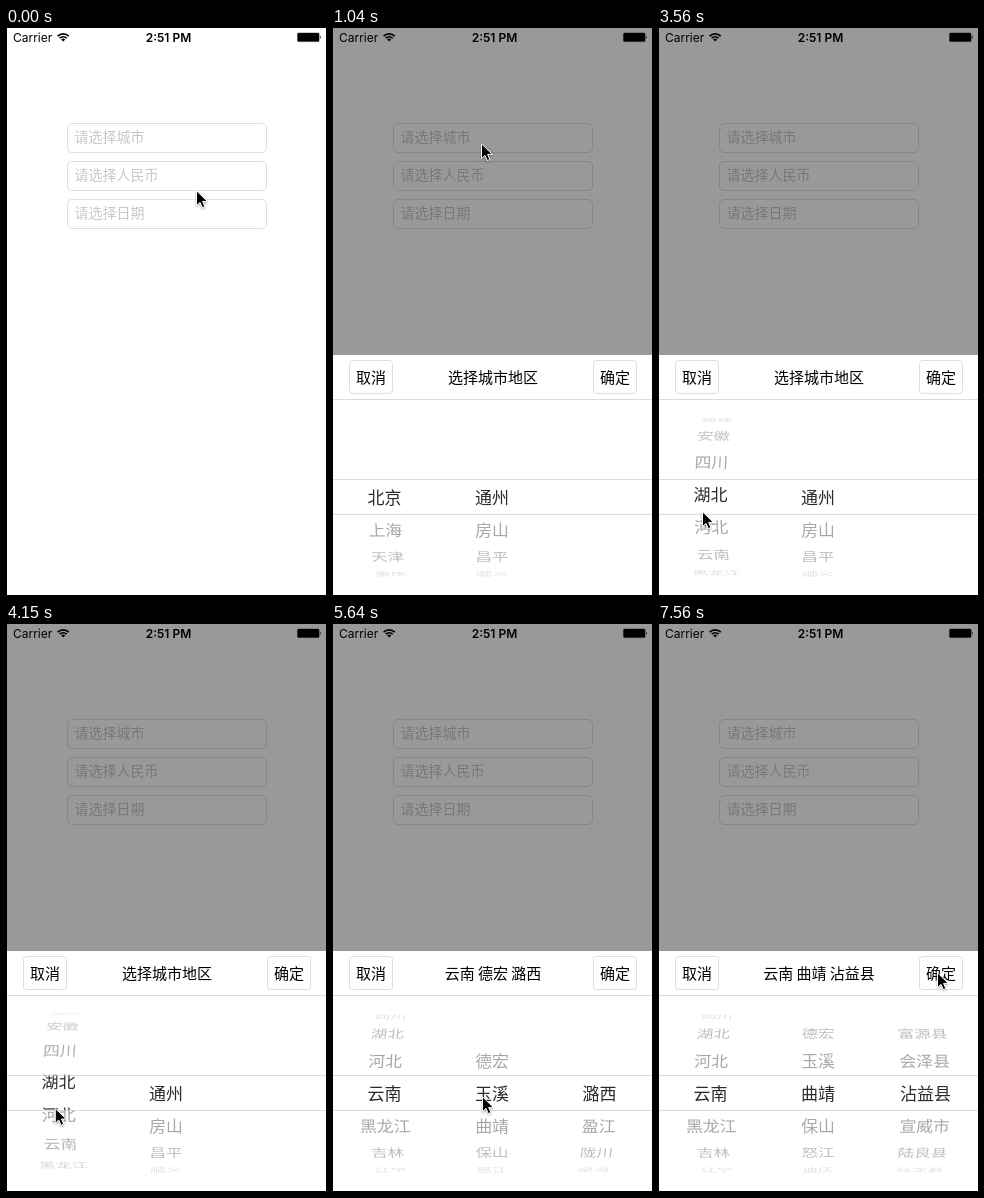
Recreate the animation shown at these times as an HTML page. Size 320 by 568 pixels, loop 8000 ms.

```html
<!DOCTYPE html>
<html lang="zh-CN">
<head>
<meta charset="utf-8">
<title>选择城市地区</title>
<style>
  html, body { margin: 0; width: 100%; height: 100%; overflow: hidden; background: #fff; }
  svg { display: block; width: 320px; height: 568px; }
  text { font-family: "Noto Sans CJK SC", "Noto Sans CJK", sans-serif; white-space: pre; }
  .status { font: 12px Inter, Roboto, sans-serif; }
  .middle { text-anchor: middle; }
  .box { fill: none; stroke: #dedede; }
  .hint { font-size: 14px; fill: #c7c7cd; }
  .bar { font-size: 15px; }
  .rule { fill: #dcdcdc; }
  .rows { font-size: 17px; text-anchor: middle; }
</style>
</head>
<body>
<svg viewBox="0 0 320 568">
  <defs>
    <clipPath id="inBand"><rect y="452" width="320" height="34"/></clipPath>
    <clipPath id="offBand"><path d="M0 372H320V452H0ZM0 486H320V568H0Z"/></clipPath>
  </defs>
  <rect width="320" height="568" fill="#fff"/>
  <g id="fields"></g>
  <rect id="dim" width="320" height="568" fill-opacity=".4"/>

  <text class="status" x="7" y="13.5">Carrier</text>
  <g fill="none" stroke="#000" stroke-width="1.7">
    <path d="M51.6 8.1A8 8 0 0 1 62.8 8.1M53.7 10.2A5 5 0 0 1 60.7 10.2"/>
    <path d="M57.2 13.4L55.2 11.4A2.9 2.9 0 0 1 59.2 11.4Z" fill="#000" stroke="none"/>
  </g>
  <text class="status middle" x="162.5" y="13.5" style="font-weight:600">2:51 PM</text>
  <rect x="291.5" y="5" width="21.6" height="8.6" rx="1.2" stroke="#000" stroke-opacity=".5" stroke-width=".8"/>
  <path d="M314.2 7.5q1.6 1.8 0 3.6Z"/>

  <g id="sheet">
    <rect y="327" width="320" height="241" fill="#fff"/>
    <rect class="box" x="17.5" y="332.5" width="43" height="33" rx="3"/>
    <rect class="box" x="261.5" y="332.5" width="43" height="33" rx="3"/>
    <text class="bar middle" x="39" y="354.7">取消</text>
    <text class="bar middle" x="283" y="354.7">确定</text>
    <text class="bar middle" x="161" y="354.7" id="title"></text>
    <rect class="rule" y="371" width="320" height="1"/>
    <rect class="rule" y="451" width="320" height="1"/>
    <rect class="rule" y="486" width="320" height="1"/>
    <g clip-path="url(#offBand)"><g class="rows" id="faded" fill="#a0a0a0"></g></g>
    <g clip-path="url(#inBand)"><g class="rows" id="chosen" fill="#2b2b2b"></g></g>
  </g>
  <path d="M0 0H1V567H320V568H0Z"/>
  <path id="cursor" d="M.5 .8V15.6L4 12.4L6.3 17.6L8.9 16.5L6.6 11.4H11.4Z"
    stroke="#fff" style="filter:drop-shadow(0 1px 1px rgba(0,0,0,.35))"/>
</svg>
<script>
const LOOP = 8000, STEPS = 54, STEP = LOOP / STEPS;
const $ = id => document.getElementById(id);
const list = names => names ? names.split(" ") : [];

const provinces = list("北京 上海 天津 重庆 广东 浙江 江苏 福建 安徽 四川 湖北 河北 云南 黑龙江 吉林 辽宁 山东");
const citiesOf = {
  北京: "通州 房山 昌平 顺义",
  云南: "德宏 玉溪 曲靖 保山 怒江 迪庆 大理"
};
const districtsOf = {
  德宏: "潞西 盈江 陇川 梁河",
  曲靖: "富源县 会泽县 沾益县 宣威市 陆良县 马龙县 师宗县"
};

// A leg eases from wherever the value is: { from, to } in steps, then the goal.
const leg = (from, to, ...goal) => ({ from, to, goal });
const pointer = [
  leg(0, 3, 149, 115),    // tap the first field
  leg(9, 17, 44, 527),    // reach the province wheel
  leg(17, 21, 44, 483),   // flick it
  leg(27, 32, 127, 494),  // cross to the cities
  leg(32, 35, 150, 500),
  leg(35, 38, 150, 472),  // drag them
  leg(39, 43, 270, 478),  // cross to the districts
  leg(43, 49, 274, 417),  // drag them
  leg(49, 51, 279, 348)   // confirm
];
const rise = [leg(4.4, 6.6, 0)];
const spins = [
  [leg(17, 24, 10.08), leg(26, 33, 12)],
  [leg(34, 42, 2)],
  [leg(42, 49, 2)]
];

const ease = p => p * p * p * (10 + p * (6 * p - 15));
const follow = (legs, start, step) => legs.reduce((at, { from, to, goal }) => {
  const p = ease(Math.min(1, Math.max(0, (step - from) / (to - from))));
  return at.map((v, i) => v + (goal[i] - v) * p);
}, start);

// Index reported by a wheel: it only changes once the wheel has come to rest.
function settled(legs, step) {
  const last = legs[legs.length - 1];
  return step >= last.to ? last.goal[0] : 0;
}

// Rows lie on a cylinder seen in slight perspective from the middle of the stage.
const RADIUS = 80.8, ROW_ANGLE = .414, DEPTH = .084, MID_X = 160, MID_Y = 469;
function wheel(names, side, scroll) {
  return names.map((name, i) => {
    const angle = (i - scroll) * ROW_ANGLE;
    if (Math.abs(angle) > 1.45) return "";
    const sin = Math.sin(angle), cos = Math.cos(angle);
    const scale = 1 - DEPTH * (1 - cos);
    const shear = -side * DEPTH * sin / RADIUS;
    const m = [scale, 0, shear, cos, MID_X + side * scale, MID_Y + RADIUS * sin];
    return `<text y="6.6" opacity="${cos.toFixed(2)}" transform="matrix(${m.map(v => v.toFixed(4))})">${name}</text>`;
  }).join("");
}

function draw(step) {
  const [p, c, d] = spins.map(legs => settled(legs, step));
  const province = provinces[p];
  const cities = list(citiesOf[province]);
  const districts = list(districtsOf[cities[c]]);
  const rows = [provinces, cities, districts].map((names, i) =>
    wheel(names, (i - 1) * 107.5, follow(spins[i], [0], step)[0])).join("");

  $("cursor").setAttribute("transform", `translate(${follow(pointer, [190, 162], step)})`);
  $("sheet").setAttribute("transform", `translate(0 ${Math.round(follow(rise, [241], step)[0])})`);
  $("dim").style.display = step < rise[0].from ? "none" : "";
  $("title").textContent = districts.length ? [province, cities[c], districts[d]].join(" ") : "选择城市地区";
  $("faded").innerHTML = $("chosen").innerHTML = rows;
}

$("fields").innerHTML = ["请选择城市", "请选择人民币", "请选择日期"].map((hint, i) =>
  `<rect class="box" x="61.5" y="${95.5 + 38 * i}" width="199" height="29" rx="4.5"/>
   <text class="hint" x="68.5" y="${114.4 + 38 * i}">${hint}</text>`).join("");

let shown = -1;
function tick() {
  const step = Math.floor((performance.now() % LOOP + 2) / STEP) % STEPS;
  if (step !== shown) draw(shown = step);
  requestAnimationFrame(tick);
}
tick();
</script>
</body>
</html>
```
